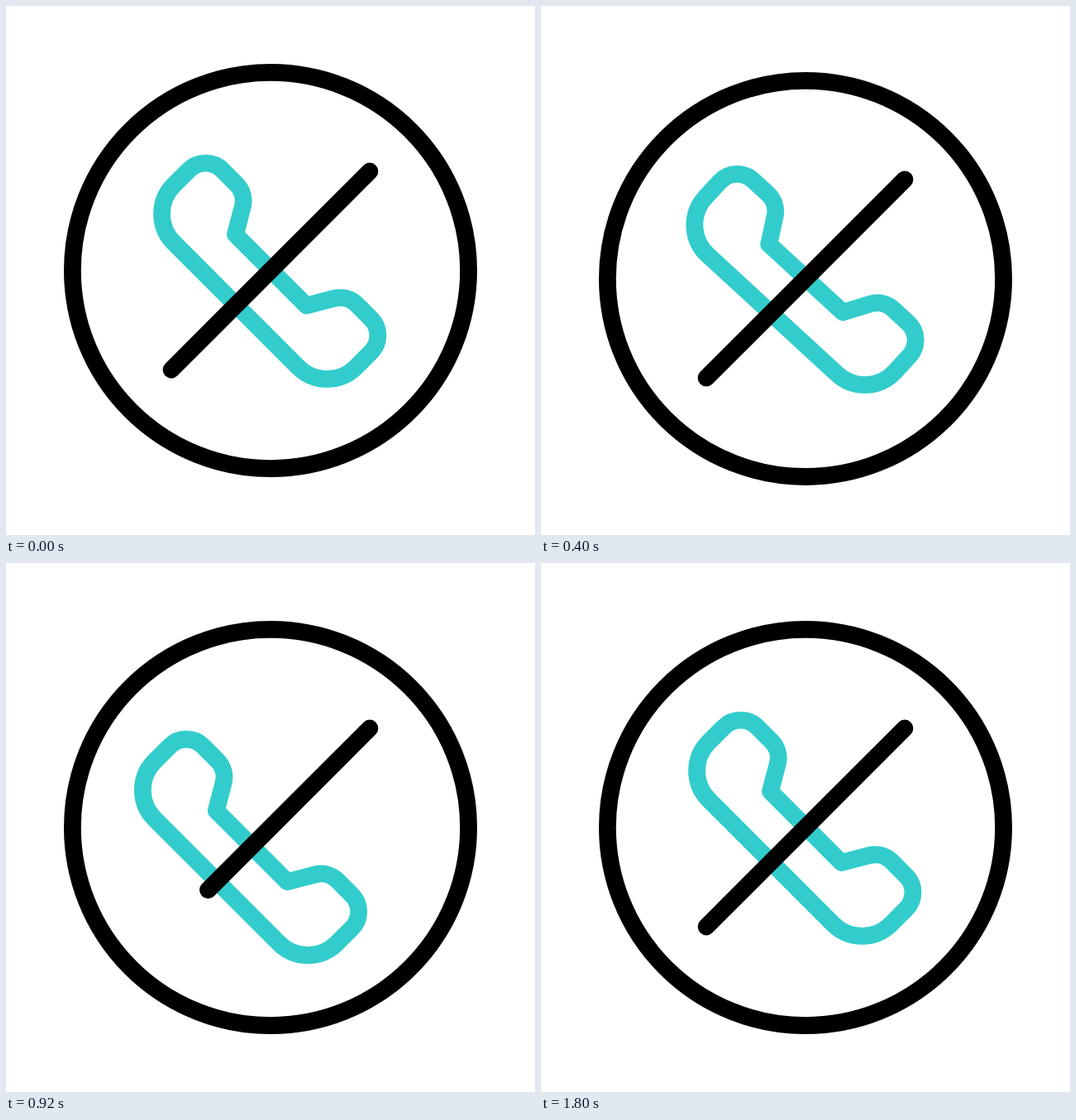
Animation, 640 px wide and 640 px high, one loop 2000 ms. Source, as an HTML page:

```html
<!DOCTYPE html>
<html lang="en">
<head>
<meta charset="utf-8">
<title>Call blocked</title>
<style>
  html, body { margin: 0; width: 100%; height: 100%; overflow: hidden; background: #fff; }
  svg { display: block; width: 100%; height: 100%; }
  svg * { fill: none; stroke-width: 20.8; stroke-linecap: round; stroke-linejoin: round; }
  .ink { stroke: #000; }
  .teal { stroke: #33cccc; }
</style>
</head>
<body>
<svg viewBox="0 0 640 640">
  <g id="badge">
    <circle class="ink" cx="320" cy="320" r="239.6"/>
    <path id="phone" class="teal" d="M277.5 276.5 L286.3 242.8 A28.5 28.5 0 0 0 278.8 215.6
      L261.6 198.4 A28.5 28.5 0 0 0 221.3 198.4 L203 216.7 A49.3 49.3 0 0 0 203 286.4
      L353.6 437 A49.3 49.3 0 0 0 423.3 437 L441.6 418.7 A28.5 28.5 0 0 0 441.6 378.4
      L424.4 361.2 A28.5 28.5 0 0 0 397.2 353.7 L363.5 362.5 Z"/>
    <g id="marks"></g>
    <line id="slash" class="ink"/>
  </g>
</svg>
<script>
const LOOP = 2000, STEP = 40;
const $ = id => document.getElementById(id);
const set = (el, attrs) => Object.entries(attrs).forEach(([k, v]) => el.setAttribute(k, v));
const show = (el, on) => set(el, { visibility: on ? 'visible' : 'hidden' });
const mix = (a, b, p) => a + (b - a) * p;

const ease = (t, from, to) => {
  const p = Math.min(1, Math.max(0, (t - from) / (to - from)));
  return p * p * (3 - 2 * p);
};

// Eased value through [time, value] keys
const track = (t, keys) => keys.slice(1).reduce(
  (v, [time, value], i) => v + (value - keys[i][1]) * ease(t, keys[i][0], time), keys[0][1]);

const BOUNCE = [[40, 0], [277, 40], [563, -36], [797, 0]];
const TILT = [[40, 0], [277, -11.4], [563, 11.4], [797, 0]];
const SLIDE = [[800, 0], [1000, 35.8], [1490, 35.8], [1700, 0]];

// Each mark runs from its inner end to its outer end
const MARKS = [[237.5, 191.4, 239.7, 175], [277, 233.4, 293.6, 232.4]]
  .flatMap(([x, y, u, v]) => [[x, y, u, v], [x + 170.5, y + 169.6, u + 170.5, v + 169.6]])
  .map(ends => {
    const el = document.createElementNS('http://www.w3.org/2000/svg', 'line');
    el.setAttribute('class', 'ink');
    $('marks').append(el);
    return { el, ends };
  });

function trim(el, [x, y, u, v], start, end) {
  set(el, { x1: mix(x, u, start), y1: mix(y, v, start), x2: mix(x, u, end), y2: mix(y, v, end) });
}

function draw(t) {
  const slide = track(t, SLIDE);
  set($('badge'), { transform: `translate(0 ${track(t, BOUNCE)})` });
  set($('phone'), { transform: `translate(${-slide} ${slide}) rotate(${track(t, TILT)} 320 320)` });

  const returning = t >= 1720;
  trim($('slash'), [200, 440, 440, 200],
    returning ? 0 : ease(t, 876, 1036), returning ? ease(t, 1720, 1800) : 1);
  show($('slash'), t < 1036 || returning);

  for (const { el, ends } of MARKS) {
    trim(el, ends, ease(t, 1300, 1490), ease(t, 1080, 1270));
    show(el, t > 1080 && t < 1490);
  }
}

let begin;
function tick(now) {
  begin ??= now;
  draw(Math.floor(((now - begin) % LOOP) / STEP) * STEP);
  requestAnimationFrame(tick);
}
draw(0);
requestAnimationFrame(tick);
</script>
</body>
</html>
```
